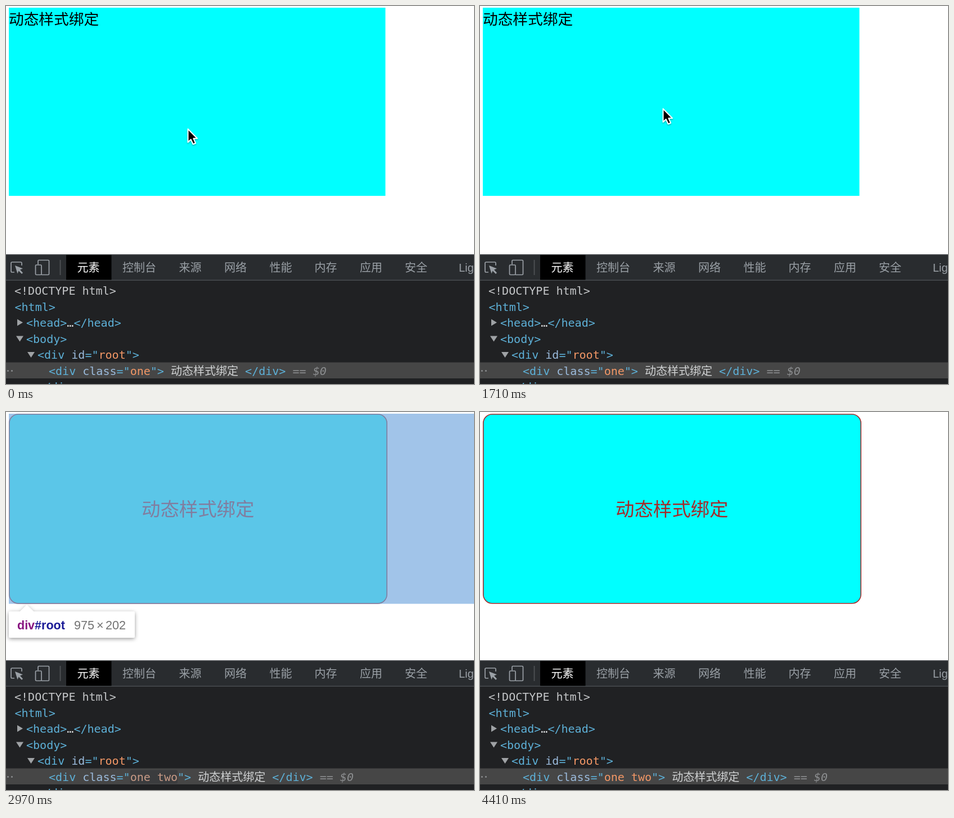
Write an HTML page that moves like this. It is 832 px wide and 673 px high and loops after 4.5 s.

```html
<!DOCTYPE html>
<html lang="zh-CN">
<head>
<meta charset="utf-8">
<title>动态样式绑定</title>
<style>
html, body { margin: 0; width: 100%; height: 100%; overflow: hidden; background: #fff; }
svg { display: block; width: 100vw; height: 100vh; }
text { white-space: pre; }
.page { font-family: "Noto Sans CJK SC", "Noto Sans CJK", sans-serif; }
.tabs { font: 20px "Noto Sans CJK SC", "Noto Sans CJK", sans-serif; fill: #9aa0a6; }
.tree { font: 20.02px "DejaVu Sans Mono", "Noto Sans CJK SC", "Noto Sans CJK", monospace; fill: #5db0d7; }
.tip { font: 21.5px "Liberation Sans", Arial, sans-serif; }
.plain { fill: #d0d2d3; }
.attr { fill: #9bbbdc; }
.val { fill: #f29766; }
.dim { fill: #8c8e90; }

.before, .after, .inspect, .hover, .arrow, .beam, .flash, .flash-bg, .move {
  animation: 4.5s -10ms infinite step-end;
}
.before { animation-name: before; }
.after { animation-name: after; }
.inspect { animation-name: inspect; }
.hover { animation-name: hover; }
.arrow { animation-name: arrow; }
.beam { animation-name: beam; }
.move { animation-name: move; }
.flash { animation-name: flash; }
.flash-bg { animation-name: flash-bg; }

@keyframes before { 0% { opacity: 1 } 40%, 100% { opacity: 0 } }
@keyframes after { 0% { opacity: 0 } 40%, 100% { opacity: 1 } }
@keyframes inspect { 0% { opacity: 0 } 66% { opacity: 1 } 68%, 100% { opacity: 0 } }
@keyframes hover { 0% { opacity: 0 } 62% { opacity: 1 } 66%, 100% { opacity: 0 } }
@keyframes arrow { 0% { opacity: 1 } 40% { opacity: 0 } 58% { opacity: 1 } 66%, 100% { opacity: 0 } }
@keyframes beam { 0% { opacity: 0 } 40% { opacity: 1 } 58%, 100% { opacity: 0 } }
@keyframes move {
  0% { transform: translate(323px, 218px) }
  2% { transform: translate(323px, 218px); animation-timing-function: steps(11) }
  24% { transform: translate(325px, 182px) }
  58% { transform: translate(340px, 198px) }
  60% { transform: translate(440px, 283px) }
  62% { transform: translate(648px, 463px) }
  64%, 100% { transform: translate(808px, 633px) }
}
@keyframes flash {
  0% { fill: #f29766 }
  40% { fill: #16242c; animation-timing-function: linear }
  46% { fill: #4e7a8e; animation-timing-function: ease-out }
  64% { fill: #9db4c8 }
  66% { fill: #c79a86 }
  68%, 100% { fill: #f29766 }
}
@keyframes flash-bg {
  0% { fill: #62a4b8; opacity: 0 }
  40% { fill: #62a4b8; opacity: 1; animation-timing-function: linear }
  46% { fill: #3b5662; opacity: 1; animation-timing-function: ease-out }
  64% { fill: #23272e; opacity: 1 }
  66% { fill: #3b3c3e; opacity: 1 }
  68%, 100% { fill: #3b3c3e; opacity: 0 }
}
</style>
</head>
<body>
<svg viewBox="0 0 832 673" preserveAspectRatio="none">
  <defs>
    <filter id="soft" x="-20%" y="-40%" width="140%" height="200%">
      <feDropShadow dx="0" dy="2" stdDeviation="3.5" flood-color="#000" flood-opacity=".4"/>
    </filter>
    <filter id="drop" x="-50%" y="-50%" width="200%" height="200%">
      <feDropShadow dx="0" dy="1.5" stdDeviation="1.2" flood-color="#000" flood-opacity=".35"/>
    </filter>
  </defs>
  <rect width="832" height="673" fill="#fff"/>

  <g class="page">
    <g class="before">
      <rect x="5" y="3" width="669.5" height="335" fill="#0ff"/>
      <text x="5" y="32.5" font-size="26.7">动态样式绑定</text>
    </g>
    <g class="after">
      <rect x="5.8" y="4" width="671.4" height="336.8" rx="16" fill="#0ff" stroke="#a52a2a" stroke-width="1.6"/>
      <text x="241" y="185.3" font-size="33.4" fill="#a52a2a">动态样式绑定</text>
    </g>
    <g class="inspect">
      <rect x="5" y="3" width="827" height="338.5" fill="#a1c4e9"/>
      <rect x="5.8" y="4" width="671.4" height="336.8" rx="16" fill="#5bc6e8" stroke="#817d9f" stroke-width="1.6"/>
      <text x="241" y="185.3" font-size="33.4" fill="#817d9f">动态样式绑定</text>
    </g>
  </g>

  <g class="inspect">
    <path d="M8 355H25L37 343.500L49 355H226a3 3 0 0 1 3 3V399a3 3 0 0 1 -3 3H8a3 3 0 0 1 -3 -3V358a3 3 0 0 1 3 -3Z" fill="#fff" filter="url(#soft)"/>
    <g class="tip">
      <text x="20" y="387" font-weight="bold" fill="#881280">div<tspan fill="#1a1a96">#root</tspan></text>
      <g fill="#737373">
        <text x="121" y="387">975</text>
        <text x="161" y="387">×</text>
        <text x="177" y="387">202</text>
      </g>
    </g>
  </g>

  <rect y="442" width="832" height="231" fill="#202123"/>
  <rect y="442" width="832" height="46" fill="#292c2f"/>
  <path d="M0 442.700H832M0 488.200H832" stroke="#494c50" stroke-width="1.500"/>
  <rect x="107" y="443.500" width="80.500" height="44" fill="#000"/>

  <g fill="none" stroke="#9aa0a6" stroke-width="1.700">
    <path d="M15 474H11a2 2 0 0 1 -2 -2V458a2 2 0 0 1 2 -2H26a2 2 0 0 1 2 2V462"/>
    <path d="M57 460V454a1.500 1.500 0 0 1 1.500 -1.500H75a1.500 1.500 0 0 1 1.500 1.500V477a1.500 1.500 0 0 1 -1.500 1.500H63"/>
    <rect x="52.500" y="461" width="10.500" height="17.500" rx="1.500"/>
    <path d="M96.500 452V479" stroke="#505357"/>
  </g>
  <path d="M16 462L30 467.500L25 469.500L30 475L28 477L22.500 471.500L20.500 476.500Z" fill="#9aa0a6"/>

  <g class="tabs">
    <text x="126.500" y="472.500" fill="#fff">元素</text>
    <text x="207" y="472.500">控制台</text>
    <text x="307.500" y="472.500">来源</text>
    <text x="388" y="472.500">网络</text>
    <text x="468.500" y="472.500">性能</text>
    <text x="548.500" y="472.500">内存</text>
    <text x="629" y="472.500">应用</text>
    <text x="709" y="472.500">安全</text>
    <text x="805" y="472.500" style="font-family: 'Liberation Sans', Arial, sans-serif">Lig</text>
    <g class="hover">
      <rect x="609" y="443.500" width="80.500" height="44" fill="#202123"/>
      <text x="629" y="472.500" fill="#f0f1f2">应用</text>
    </g>
  </g>

  <rect y="634.500" width="832" height="28.500" fill="#464646"/>
  <path d="M20 557.500L30 563.500L20 569.500ZM18 587.500H31L24.500 597.500ZM38 616H51L44.500 626Z" fill="#9fa2a5"/>
  <g fill="#8c8e90"><circle cx="3.500" cy="649.500" r="1.500"/><circle cx="10.500" cy="649.500" r="1.500"/></g>

  <g class="tree">
    <text x="15" y="514" fill="#c4c6c8">&lt;!DOCTYPE html&gt;</text>
    <text x="15.500" y="542.500">&lt;html&gt;</text>
    <text x="36" y="571">&lt;head&gt;<tspan class="plain">…</tspan>&lt;/head&gt;</text>
    <text x="36" y="599.500">&lt;body&gt;</text>
    <text x="56" y="628">&lt;div <tspan class="attr">id</tspan>="<tspan class="val">root</tspan>"&gt;</text>
    <g class="before">
      <text x="76" y="656.500">&lt;div <tspan class="attr">class</tspan>="<tspan class="val">one</tspan>"&gt;<tspan class="plain"> 动态样式绑定 </tspan>&lt;/div&gt;<tspan class="dim"> == <tspan font-style="italic">$0</tspan></tspan></text>
    </g>
    <g class="after">
      <rect class="flash-bg" x="220.500" y="637.500" width="84.500" height="24" rx="3"/>
      <text x="76" y="656.500">&lt;div <tspan class="attr">class</tspan>="<tspan class="flash">one two</tspan>"&gt;<tspan class="plain"> 动态样式绑定 </tspan>&lt;/div&gt;<tspan class="dim"> == <tspan font-style="italic">$0</tspan></tspan></text>
    </g>
    <text x="56" y="684.500">&lt;/div&gt;</text>
  </g>

  <g class="arrow">
    <g class="move">
      <path d="M0.500 1V24.500L5.700 19.600L9.600 28L14 26.200L10.300 17.800H17Z" fill="#000" stroke="#fff" stroke-width="2" stroke-linejoin="round" filter="url(#drop)"/>
    </g>
  </g>
  <g class="beam" fill="none" stroke-linecap="round">
    <path id="caret" d="M320 172.500Q325 172.500 325 177V191.500Q325 195.500 320 195.500M330 172.500Q325 172.500 325 177M325 191.500Q325 195.500 330 195.500M322.500 184.500H327.500" stroke="#fff" stroke-width="4.600"/>
    <use href="#caret" style="display: none"/>
    <path d="M320 172.500Q325 172.500 325 177V191.500Q325 195.500 320 195.500M330 172.500Q325 172.500 325 177M325 191.500Q325 195.500 330 195.500M322.500 184.500H327.500" stroke="#000" stroke-width="2"/>
  </g>
</svg>
</body>
</html>
```
